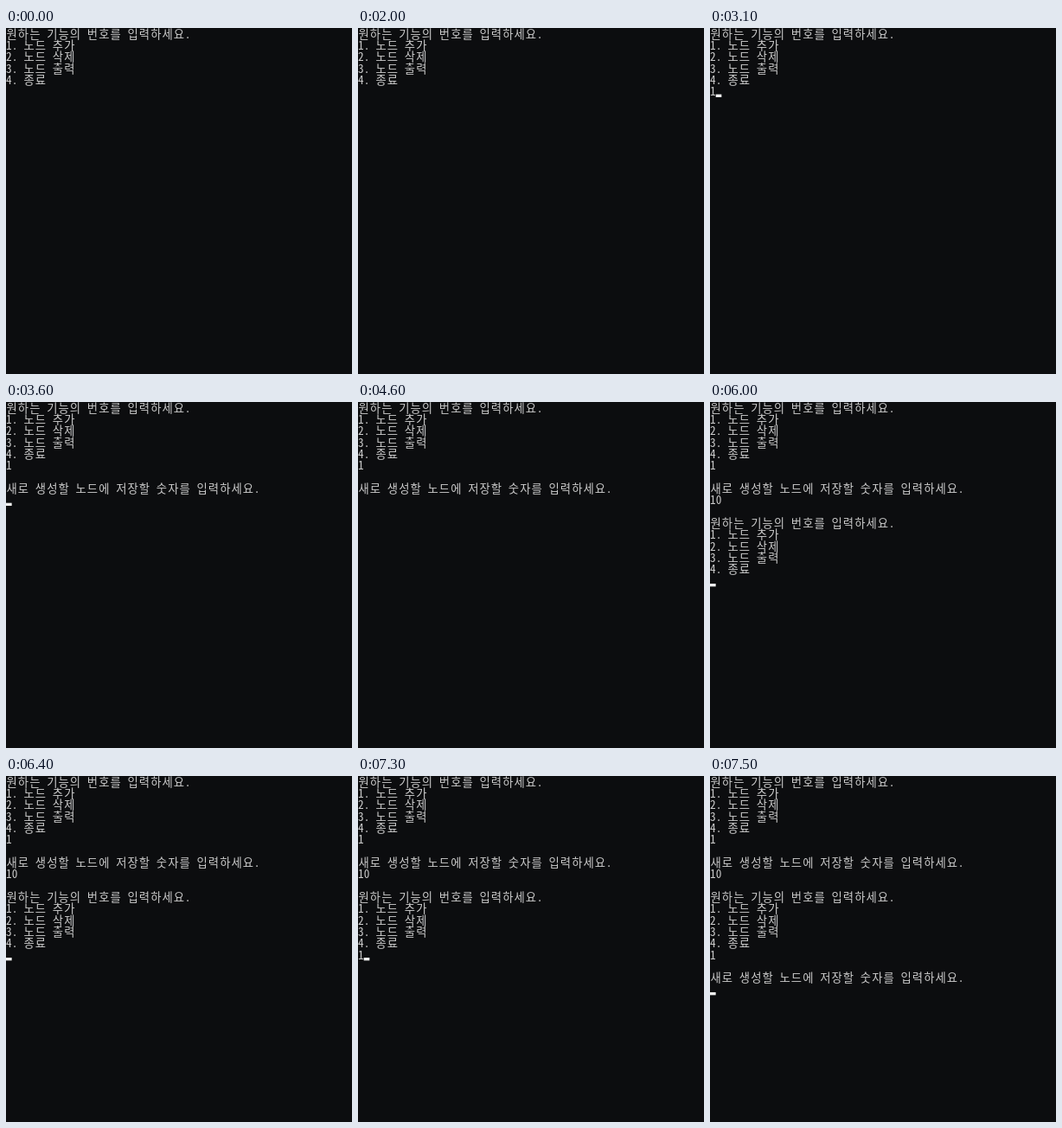
Write an HTML page with a canvas that moves like this. It is 400x400 px and loops after 8 s.

```html
<!DOCTYPE html>
<html lang="ko">
<head>
<meta charset="utf-8">
<style>
html, body { margin: 0; height: 100%; overflow: hidden; background: #0c0d0f; }
canvas { display: block; }
</style>
</head>
<body>
<canvas width="400" height="400"></canvas>
<script>
const ctx = document.querySelector('canvas').getContext('2d');
const LOOP = 8000, ROW = 40 / 3, COL = ROW / 2;

const menu = '원하는 기능의 번호를 입력하세요.\n1. 노드 추가\n2. 노드 삭제\n3. 노드 출력\n4. 종료\n';
const ask = '1\n\n새로 생성할 노드에 저장할 숫자를 입력하세요.\n';
const first = menu + ask;
const second = first + '10\n\n' + menu;

// [start in ms, screen text, cursor visible]
const steps = [
  [0, menu, 0], [400, menu, 1], [900, menu, 0], [1400, menu, 1],
  [2000, menu, 0], [2500, menu, 1], [3000, menu + '1', 0], [3100, menu + '1', 1],
  [3600, first, 1], [4600, first, 0], [5100, first, 1],
  [5200, first + '1', 0], [5600, first + '10', 0], [5700, first + '10', 1],
  [6000, second, 1], [6700, second, 0], [7200, second + '1', 1],
  [7400, second + ask, 1]
];

function draw(text, cursor) {
  ctx.fillStyle = '#0c0d0f';
  ctx.fillRect(0, 0, 400, 400);
  ctx.font = `${ROW}px "Noto Sans Mono CJK KR", "Noto Sans CJK KR", "Noto Sans CJK", monospace`;
  ctx.textAlign = 'center';
  ctx.fillStyle = '#ccc';
  let col = 0, row = 0;
  for (const ch of text) {
    if (ch === '\n') { col = 0; row++; continue; }
    const cells = ch >= '가' ? 2 : 1;
    ctx.fillText(ch, (col + cells / 2) * COL, row * ROW + 11.5);
    col += cells;
  }
  if (cursor) {
    ctx.fillStyle = '#f2f2f2';
    ctx.fillRect(col * COL, row * ROW + 10, COL, ROW / 4);
  }
}

function frame() {
  const t = performance.now() % LOOP;
  const [, text, cursor] = steps.findLast(s => s[0] <= t);
  draw(text, cursor);
  requestAnimationFrame(frame);
}
frame();
</script>
</body>
</html>
```
